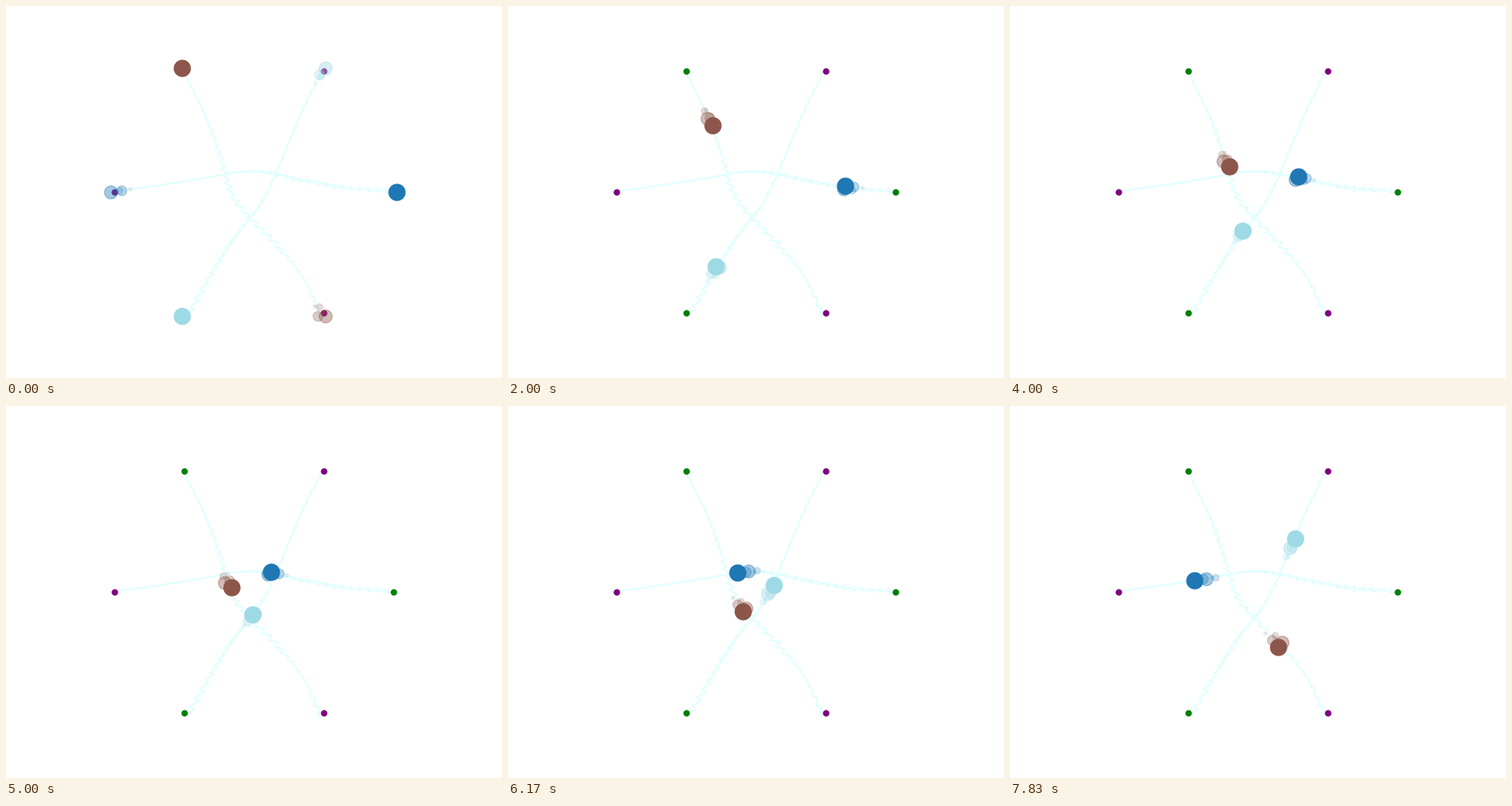
Animation, 640 px wide and 480 px high, one loop 8000 ms. Source, as a matplotlib script:

```python
import numpy as np
import matplotlib.pyplot as plt
from matplotlib.animation import FuncAnimation

W, H = 640, 480
LOOP, TICK = 8000, 40     # ms
SHOWN = 48                # steps shown in one loop
STEPS = 66                # points on each full path
TRAIL = 4                 # fading markers behind each agent
CENTER = np.array([W / 2, H / 2])
SHIFT = np.array([-0.5, 0])

# Every path is a smooth curve through points at these steps, plus a hop
# that changes sides on each step and blends between three vectors.
STOPS = np.array([0, 10, 20, 34, 47, 56, 65])
HOP_STOPS = [0, 47, 65]
AGENTS = [
    dict(color="#1f77b4", angle=0,
         curve=[(501, 239), (442.5, 235.2), (388.5, 225.8), (317.3, 213.3),
                (243, 224.4), (191, 232.3), (139.4, 239.3)],
         hop=[(3.6, -2.2), (4.8, -0.4), (4, -0.7)]),
    dict(color="#8c564b", angle=120,
         curve=[(231.5, 88), (258, 142), (274.7, 187.5), (297, 251.6),
                (351, 310.2), (383, 349.5), (408, 403)],
         hop=[(1.7, 3.2), (4.5, -0.9), (-3.2, 3.4)]),
    dict(color="#9edae5", angle=240,
         curve=[(235.5, 398), (267, 343.2), (292.3, 302.9), (332.5, 249.5),
                (366.2, 174.3), (384.5, 130.5), (410, 81.3)],
         hop=[(-4.5, 1.2), (-2.2, 3.1), (-2.2, 1.2)]),
]


def on_ring(degrees, radius=180):
    a = np.radians(degrees)
    return CENTER + radius * np.array([np.cos(a), -np.sin(a)])


def smooth(points, n):
    """Cubic Hermite curve through the points."""
    p = np.array(points)
    slope = np.gradient(p, STOPS, axis=0)
    k = np.clip(np.searchsorted(STOPS, n, "right") - 1, 0, len(STOPS) - 2)
    h = (STOPS[k + 1] - STOPS[k])[:, None]
    t = (n - STOPS[k])[:, None] / h
    return (p[k] * (1 + 2 * t) * (1 - t) ** 2 + p[k + 1] * t * t * (3 - 2 * t)
            + h * slope[k] * t * (1 - t) ** 2 + h * slope[k + 1] * t * t * (t - 1))


def zigzag(curve, hop, angle):
    n = np.arange(STEPS)
    size = np.column_stack([np.interp(n, HOP_STOPS, axis) for axis in zip(*hop)])
    side = np.where(n % 2, -1, 1)[:, None]
    path = smooth(curve, n) + side * size
    path[0] = on_ring(angle, 184.8)
    path[-1] = on_ring(angle + 180, 184.8)
    return path + SHIFT


fig = plt.figure(figsize=(W / 100, H / 100), dpi=100, facecolor="white")
ax = fig.add_axes([0, 0, 1, 1])
ax.set_xlim(0, W)
ax.set_ylim(H, 0)
ax.axis("off")

markers = []
for agent in AGENTS:
    angle = agent["angle"]
    path = zigzag(agent["curve"], agent["hop"], angle)
    ax.plot(*path.T, color="lightcyan", lw=1.5, zorder=1)
    for spot, color in ((angle, "green"), (angle + 180, "purple")):
        ax.plot(*on_ring(spot), "o", color=color, ms=5, zorder=2)

    # Trail from oldest to newest, then the agent itself.
    for back in range(TRAIL, -1, -1):
        near = 1 - back / (TRAIL + 1)
        dot, = ax.plot([], [], "o", color=agent["color"], ms=15 * near,
                       alpha=0.5 * near if back else 1, zorder=3)
        markers.append((dot, path, back))


def update(i):
    # A step begins with the tick that holds its start time.
    step = min((i + 1) * TICK * SHOWN // LOOP, SHOWN - 1)
    for dot, path, back in markers:
        x, y = path[(step - back) % STEPS]
        dot.set_data([x], [y])
    return [dot for dot, _, _ in markers]


anim = FuncAnimation(fig, update, frames=LOOP // TICK, interval=TICK,
                     repeat=True, repeat_delay=0, blit=False)
plt.show()
```
